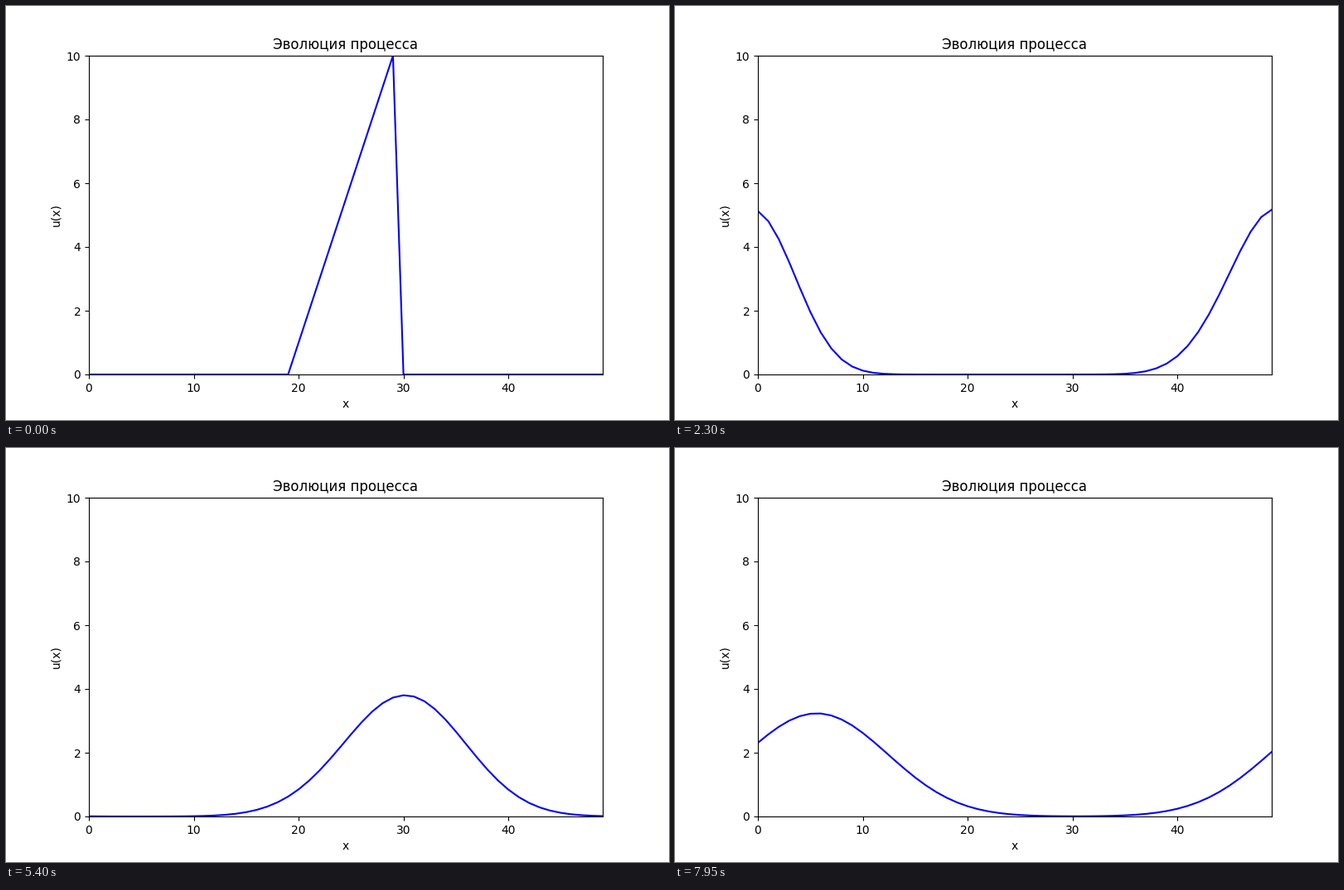
Write a matplotlib script that moves like this. It is 800x500 px and loops after 8 s.

```python
import numpy as np
import matplotlib.pyplot as plt
from matplotlib.animation import FuncAnimation

N = 50          # grid nodes, periodic
COURANT = 0.5   # shift per step, in cells
FRAMES = 160
INTERVAL = 50   # ms


def initial_profile():
    """Sawtooth pulse: a ramp from 1 to 10, then a sharp drop."""
    u = np.zeros(N)
    u[20:30] = np.arange(1, 11)
    return u


def evolve(u, steps):
    """Upwind scheme for the transport equation, one row per step."""
    rows = [u]
    for _ in range(steps - 1):
        u = u - COURANT * (u - np.roll(u, 1))
        rows.append(u)
    return rows


x = np.arange(N)
history = evolve(initial_profile(), FRAMES)

plt.rcParams["font.family"] = "DejaVu Sans"
fig, ax = plt.subplots(figsize=(8, 5), dpi=100)
line, = ax.plot(x, history[0], color="blue", lw=1.5)
ax.set_xlim(0, N - 1)
ax.set_ylim(0, 10)
ax.set_title("Эволюция процесса")
ax.set_xlabel("x")
ax.set_ylabel("u(x)")


def update(frame):
    line.set_ydata(history[frame])
    return line,


anim = FuncAnimation(fig, update, frames=FRAMES, interval=INTERVAL,
                     repeat=True, repeat_delay=0)
plt.show()
```
